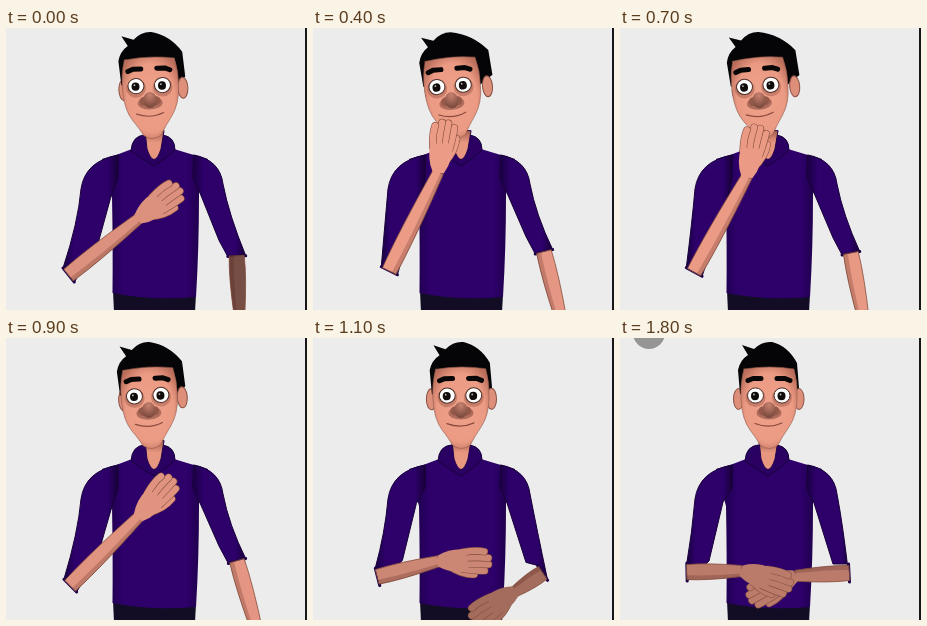
Animation of 301x282 px, one loop 2.5 s. Source, as an HTML page:

```html
<!DOCTYPE html>
<html lang="en">
<head>
<meta charset="utf-8">
<title>Signing figure</title>
<style>
  html, body { margin: 0; width: 100%; height: 100%; overflow: hidden; background: #ececec; }
  svg { display: block; width: 301px; height: 282px; }
</style>
</head>
<body>
<svg viewBox="0 0 301 282">
  <defs>
    <linearGradient id="shirt">
      <stop offset="0" stop-color="#190040"/>
      <stop offset=".2" stop-color="#2d006a"/>
      <stop offset=".8" stop-color="#2d006a"/>
      <stop offset="1" stop-color="#180039"/>
    </linearGradient>
    <radialGradient id="face" cx=".5" cy=".5" r=".6">
      <stop offset="0" stop-color="#f0a28b"/>
      <stop offset=".7" stop-color="#eb9a83"/>
      <stop offset="1" stop-color="#b96d5a"/>
    </radialGradient>
    <radialGradient id="nose" cx=".5" cy=".2" r=".8">
      <stop offset="0" stop-color="#c98270"/>
      <stop offset="1" stop-color="#754639"/>
    </radialGradient>
    <linearGradient id="neck" x2="0" y2="1">
      <stop offset="0" stop-color="#a5604f"/>
      <stop offset=".4" stop-color="#e7967f"/>
    </linearGradient>
  </defs>
  <g id="scene"></g>
</svg>
<script>
const scene = document.getElementById('scene');
const LOOP = 2500, STEP = 100;

// lift: left hand from waist (0) to mouth (1); swing: right arm from folded (0) to hanging (1).
const keys = [
  { at: 0, lift: .47, swing: .87 },
  { at: 200, lift: 1, swing: 1 },
  { at: 700, lift: .94, swing: .95 },
  { at: 900, lift: .6, swing: 1 },
  { at: 1100, lift: .11, swing: .3 },
  { at: 1200, lift: 0, swing: 0 }
];

const clamp = x => Math.max(0, Math.min(1, x));
const lerp = (a, b, k) => a + (b - a) * k;
const curve = (a, b, c, k) => a.map((v, i) => lerp(lerp(v, b[i], k), lerp(b[i], c[i], k), k));
const polar = ([x, y], deg, r) => {
  const a = deg * Math.PI / 180;
  return [x + r * Math.cos(a), y + r * Math.sin(a)];
};
const angleOf = (a, b) => Math.atan2(b[1] - a[1], b[0] - a[0]) * 180 / Math.PI;
const skin = light => `rgb(${[240, 158, 137].map(c => Math.round(c * light))})`;

const path = (d, fill, stroke = 'none', width = 1) =>
  `<path d="${d}" fill="${fill}" stroke="${stroke}" stroke-width="${width}" stroke-linecap="round" stroke-linejoin="round"/>`;
const oval = (x, y, rx, ry, fill, stroke = 'none') =>
  `<ellipse cx="${x}" cy="${y}" rx="${rx}" ry="${ry}" fill="${fill}" stroke="${stroke}"/>`;
const box = (x, y, w, h, fill) => `<rect x="${x}" y="${y}" width="${w}" height="${h}" fill="${fill}"/>`;
const group = (transform, content) => `<g transform="${transform}">${content}</g>`;

// Monotone cubic through the keys, so the arms speed up and settle without overshoot.
function track(name, t) {
  const last = keys.length - 1;
  if (t >= keys[last].at) return keys[last][name];
  const slope = i => (keys[i + 1][name] - keys[i][name]) / (keys[i + 1].at - keys[i].at);
  const tangent = i => {
    if (i === 0) return slope(0);
    if (i === last) return 0;
    const a = slope(i - 1), b = slope(i);
    return a * b > 0 ? 2 * a * b / (a + b) : 0;
  };
  const i = keys.findIndex(k => k.at > t) - 1;
  const span = keys[i + 1].at - keys[i].at, u = (t - keys[i].at) / span;
  const ease = u * u * (3 - 2 * u);
  return lerp(keys[i][name], keys[i + 1][name], ease) +
    span * u * (1 - u) * ((1 - u) * tangent(i) - u * tangent(i + 1));
}

function forearm(elbow, wrist, fill) {
  const dir = angleOf(elbow, wrist), mid = curve(elbow, elbow, wrist, .6);
  const side = (s, start, belly, end) =>
    [polar(elbow, dir + s, start), polar(mid, dir + s, belly), polar(wrist, dir + s, end)];
  const [a1, m1, b1] = side(-90, 7.5, 9, 5.5), [a2, m2, b2] = side(90, 7.5, 9, 5.5);
  const [a3, m3, b3] = side(90, 3, 4.5, 2.5);
  return path(`M${a1}Q${m1} ${b1}L${b2}Q${m2} ${a2}Z`, fill, '#85503f', .8) +
    path(`M${a3}Q${m3} ${b3}L${b2}Q${m2} ${a2}Z`, 'rgba(70,25,20,.22)');
}

// Drawn along +x from the wrist, then turned into place.
function hand([x, y], angle, flip, fill) {
  const stroke = d => path(d, 'none', '#85503f', 7.6) + path(d, 'none', fill, 6.4);
  let out = stroke('M10 5Q22 14 35 14');
  for (let i = 3; i >= 0; i--) {
    const row = i - 1.5, reach = 50 - 2 * row * row;
    out += stroke(`M24 ${row * 5.6}Q38 ${row * 7} ${reach} ${row * 6.4 + 1}`);
  }
  out += path('M-1 -5.5Q12 -13 27 -11L30 10Q14 14 -1 5.5Z', fill);
  return group(`translate(${x} ${y}) rotate(${angle}) scale(1 ${flip})`, out);
}

function sleeve(shoulder, control, elbow, bend, pit, dir, outerSide) {
  const outer = polar(elbow, dir + outerSide, 9), inner = polar(elbow, dir - outerSide, 9);
  return path(`M${shoulder} ${control} ${outer}L${inner}L${bend}L${pit}Z`, 'url(#shirt)', '#180039') +
    path(`M${outer}L${inner}`, 'none', '#1c0046', 3);
}

function leftArm(lift) {
  const wrist = curve([122, 233], [142, 188], [125, 143], lift);
  const joint = curve([72, 234], [58, 252], [79, 238], lift);
  const dir = angleOf(joint, wrist), elbow = polar(joint, dir, -5);
  const fill = skin(.78 + .2 * Math.sqrt(lift));
  return {
    sleeve: sleeve('112 127Q79 133 75 161', 'Q72 195', elbow, [89 + 4 * lift, 223 - 7 * lift],
      `${103 + 3 * lift} ${164 + 14 * lift}L112 150`, dir, -90),
    skin: forearm(elbow, wrist, fill) + hand(wrist, 16 - 100 * lift ** .8, 1, fill)
  };
}

function rightArm(swing) {
  const elbow = [229 + 2 * swing, 235 - 12 * swing ** 4];
  const dir = 177 - 103 * swing;
  const wrist = polar(elbow, dir, 54 * (1 - swing) ** 2 + 75 * swing ** 2);
  const fill = skin(.78 - .33 * swing + .5 * clamp((swing - .87) / .08));
  return {
    sleeve: sleeve('188 127Q214 132 217 156', 'Q223 187', elbow, [213, 226 - 18 * swing ** 2],
      '194 165L187 150', dir, -90),
    skin: forearm(elbow, wrist, fill) + hand(wrist, 155 - 75 * swing ** 2, -1, fill)
  };
}

function eye(x, y, shut) {
  const lid = lerp(-16, 15, shut);
  return oval(x, y + 2, 10, 9.5, 'rgba(130,66,52,.35)') + oval(x, y, 8, 7.6, '#fff', '#4d2f28') +
    oval(x - .5, y + .5, 4, 4.2, '#100c0b') + oval(x - 1.5, y - 1, .9, .9, '#bbb') +
    (shut ? path(`M${x - 8.5} ${y}A8.5 8 0 0 1 ${x + 8.5} ${y}Q${x} ${y + lid} ${x - 8.5} ${y}Z`, '#d88a74', '#5b372f', .8) : '');
}

function headView(turn, shut) {
  const back = 11 * turn;
  const ear = x => oval(x, 61, 5, 10.5, '#dd8f7a', '#895044');
  const hair = `M120 56L118 32Q120 22 128 17L122 7L134 11Q142 3 152 4Q${168 + back / 2} 8 ${177 + back} 25L${179 + back} 50L172 62Z`;
  const shape = 'M124 31Q120 45 121 62Q122 81 130 92Q137 101 140 107Q149 114 158 107Q162 99 169 89Q177 77 177 60Q178 45 174 31Q150 27 124 31Z';
  const features = eye(135.5, 57.5, shut) + eye(162, 57.5, shut) +
    path('M128 42.5L133 40.5L141 40.5M157 40.5L165 40.5L170 42.5', 'none', '#080606', 5) +
    oval(149, 75, 12.5, 6.5, 'rgba(125,68,56,.55)') +
    oval(143, 73, 4.5, 4.5, '#95594a') + oval(155, 73, 4.5, 4.5, '#95594a') + oval(149, 72, 6.8, 8, 'url(#nose)') +
    path('M135 85.5Q149 91 162 85', 'none', '#8a4b3f', 1.2);
  return group(`translate(${-5 * turn}) rotate(${-5 * turn} 149 112)`,
    ear(118.5 + 8 * turn) + path(hair, '#050507') + ear(179 + 5 * turn) +
    path(shape, 'url(#face)', '#91594b', .6) + group(`translate(${-2 * turn})`, features));
}

const torso =
  path('M107 263L190 266L189 284H108Z', '#120d25') +
  path('M126 121Q112 127 96 131Q101 150 106 168Q107 220 106.5 265Q145 273 190 269Q193 220 193 166Q197 148 202 131Q184 126 168 121Z', 'url(#shirt)') +
  path('M138 107Q126 108 125 123Q135 130 148 138Q161 130 169 122Q169 109 157 107Z', '#2a0063', '#180039') +
  path('M139 103L141 121Q148 142 155 121L158 103Z', 'url(#neck)', '#20004a');

// The lids drop at once, hold, and open in two steps.
const blink = t => t < 1300 || t >= 1600 ? 0 : t < 1500 ? 1 : .5;

function render(t) {
  const lift = track('lift', t);
  const left = leftArm(lift), right = rightArm(track('swing', t));
  scene.innerHTML = box(0, 0, 301, 282, '#ececec') + torso + left.sleeve + right.sleeve +
    headView(lift, blink(t)) + right.skin + left.skin +
    (t >= 1800 ? oval(29, -5, 16, 16, '#959595') : '') + box(299, 0, 2, 282, '#15151a');
}

const began = performance.now();
let shown = -1;
function tick() {
  const t = Math.floor((performance.now() - began) % LOOP / STEP) * STEP;
  if (t !== shown) render(shown = t);
  requestAnimationFrame(tick);
}
tick();
</script>
</body>
</html>
```
